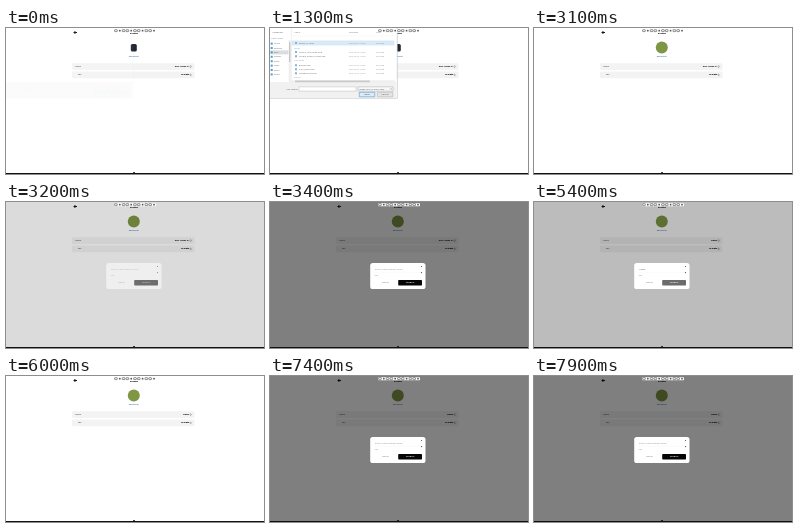
These frames come from a looping animation (258x146 px, 8000 ms). An HTML page with a canvas:

```html
<!DOCTYPE html>
<html lang="en">
<head>
<meta charset="utf-8">
<title>Profile settings</title>
<style>
html, body { margin: 0; width: 100%; height: 100%; overflow: hidden; background: #fff; }
canvas { display: block; width: 258px; height: 146px; }
</style>
</head>
<body>
<canvas id="stage"></canvas>
<script>
const W = 258, H = 146, LOOP = 8000;
const canvas = document.getElementById('stage');
const ctx = canvas.getContext('2d');
const dpr = window.devicePixelRatio || 1;
canvas.width = W * dpr;
canvas.height = H * dpr;

const OLD_NAME = 'user name 01', NEW_NAME = 'Nadia';
const HINT = 'Enter a new display name';

const ramp = (t, a, b) => Math.max(0, Math.min(1, (t - a) / (b - a)));
const ease = p => p * p * (3 - 2 * p);

function box(x, y, w, h, fill, stroke, r = 0) {
  ctx.beginPath();
  ctx.roundRect(x, y, w, h, r);
  if (fill) { ctx.fillStyle = fill; ctx.fill(); }
  if (stroke) { ctx.strokeStyle = stroke; ctx.lineWidth = 0.5; ctx.stroke(); }
}

function dot(x, y, r, fill) {
  ctx.beginPath();
  ctx.arc(x, y, r, 0, Math.PI * 2);
  ctx.fillStyle = fill;
  ctx.fill();
}

function line(points, color, width = 0.5) {
  ctx.beginPath();
  points.forEach(([x, y], i) => i ? ctx.lineTo(x, y) : ctx.moveTo(x, y));
  ctx.strokeStyle = color;
  ctx.lineWidth = width;
  ctx.stroke();
}

function text(s, x, y, size, color, align = 'left', weight = 400) {
  ctx.font = `${weight} ${size}px "Open Sans", sans-serif`;
  ctx.textAlign = align;
  ctx.textBaseline = 'middle';
  ctx.fillStyle = color;
  ctx.fillText(s, x, y);
}

function withAlpha(a, draw) {
  if (a <= 0) return;
  ctx.save();
  ctx.globalAlpha = a;
  draw();
  ctx.restore();
}

function row(y, label, labelX, value, weight) {
  box(66, y, 122.5, 6.6, '#f3f3f3', null, 0.8);
  text(label, labelX, y + 3.3, 2, '#444', 'left', 600);
  text(value, 183.4, y + 3.3, 2.2, '#000', 'right', weight);
  line([[184.3, y + 2.4], [185.3, y + 3.3], [184.3, y + 4.2]], '#222');
}

function drawPage(t) {
  box(0, 0, W, H, '#fff');
  line([[71, 4.5], [68, 4.5], [69.4, 3]], '#000', 0.9);
  line([[68, 4.5], [69.4, 6]], '#000', 0.9);
  text('Profile', 128, 5.3, 2.3, '#000', 'center', 800);
  if (t < 2200) box(124.8, 16, 6, 7.6, '#202836', null, 1.6);
  else dot(127.8, 19.5, 6, '#7f9645');
  text('Edit photo', 127.8, 28.6, 2, '#1f63b0', 'center', 600);
  row(35.3, 'Name', 69, t < 5300 ? OLD_NAME : NEW_NAME, 700);
  row(43.6, 'Sex', 72, 'Private', 800);
  box(127, 144, 2, 1, '#444');
}

function drawSidebar() {
  text('Organize', 2.5, 4, 2.5, '#555');
  text('New folder', 1, 10, 2.4, '#888');
  box(0, 22.4, 18.5, 4, '#d9dde1');
  ['Home', 'Desktop', 'Files', 'Images', 'Music', 'Video', 'Disk C', 'Disk D'].forEach((s, i) => {
    const y = 15.6 + i * 4.4;
    box(0.7, y - 1, 2, 2, '#4d9bd3');
    text(s, 3.7, y, 2.2, '#666');
  });
  box(18.7, 12, 2, 42, '#eee');
  box(19, 14, 1.4, 20, '#c6c6c6');
}

function drawFiles(hover) {
  text('Name', 24, 4.1, 2.2, '#777');
  text('Modified', 79, 4.1, 2.2, '#777');
  text('Type', 106, 4.1, 2.2, '#777');
  line([[22, 8], [124, 8]], '#f0f0f0');
  const rows = [
    ['photo_01.png', 15], ['', 20], ['screen_recording.png', 24], ['profile_picture_draft.png', 28.2],
    ['', 32.8], ['garden.jpg', 37.2], ['icon_large.png', 41.2], ['background.png', 45.2], ['', 49.5]
  ];
  rows.forEach(([name, y], i) => {
    if (i === hover) box(22, y - 2.1, 102, 4.2, '#d9ebf9', '#c2def3');
    if (!name) {
      text(['Today', 'This week', 'Earlier'][(i - 1) / 3 | 0], 24, y, 2.2, '#8ba2b8');
      return;
    }
    box(25, y - 1, 2, 2, '#84b5d8');
    text(name, 29, y, 2.3, '#666');
    text('2021/4/12 10:' + (20 + i), 79, y, 2.2, '#8b8b8b');
    text('PNG file', 106, y, 2.2, '#8b8b8b');
  });
  box(22, 52.2, 103, 2.3, '#efefef');
  box(25, 52.5, 75, 1.7, '#c9c9c9');
}

function drawFooter(t) {
  text('File name:', 28, 61, 2.4, '#555', 'right');
  box(29, 58.8, 57, 4.3, '#fff', '#bbb');
  if (t >= 1500) text('photo_01.png', 30, 61, 2.3, '#444');
  box(88, 58.8, 35, 4.3, '#f8f8f8', '#aaa');
  text('Image files (*.png;*.jpg)', 89, 61, 2.3, '#555');
  line([[120, 60.5], [120.9, 61.4], [121.8, 60.5]], '#666');
  box(89.3, 64.3, 15.5, 4.5, '#dcebf7', '#3786c5');
  text('Open', 97, 66.5, 2.4, '#444', 'center');
  box(107.3, 64.3, 15.5, 4.5, '#e4e4e4', '#aaa');
  text('Cancel', 115, 66.5, 2.4, '#555', 'center');
}

function drawPicker(t) {
  const opening = t < 1700;
  const shown = opening ? 0.04 + 0.96 * ramp(t, 0, 250) : 1 - ramp(t, 1700, 1900);
  const hover = t < 800 ? -1 : t < 900 ? 7 : t < 1000 ? 5 : t < 1100 ? 3 : t < 1200 ? 2 : 0;
  withAlpha(shown, () => {
    box(-2, -2, 129.3, 72.3, '#fff', '#aaa');
    // The panel tint arrives before the controls do.
    withAlpha(opening ? Math.max(0.3, shown) : shown, () => box(0, 54, 126, 16, '#f1f1f1'));
    drawFooter(t);
    withAlpha(shown * ramp(t, 150, 350), drawSidebar);
    withAlpha(shown * ramp(t, 250, 450), () => drawFiles(hover));
    line([[21.3, 0], [21.3, 55]], '#ddd');
  });
}

function fieldText(t) {
  if (t >= 6800 || t < 3900) return [HINT, '#888'];
  if (t < 4500) {
    const left = 1 - Math.min(6, Math.floor((t - 3900) / 100) + 1) / 6;
    return [HINT.slice(0, Math.floor(HINT.length * left)), '#888'];
  }
  return [NEW_NAME.slice(0, Math.max(0, Math.floor((t - 4600) / 100) + 1)), '#555'];
}

function drawModal(t) {
  const amount = t < 5200 ? ease(ramp(t, 3100, 3390))
    : t < 6800 ? 1 - ramp(t, 5220, 5600)
    : ease(ramp(t, 7100, 7400));
  if (amount <= 0) return;
  box(0, 0, W, H, `rgba(0,0,0,${0.5 * amount})`);
  withAlpha(Math.min(1, amount * 2), () => {
    box(100.2, 61, 55.3, 26, '#fff', null, 2.6);
    line([[151, 64], [152, 65]], '#333');
    line([[152, 64], [151, 65]], '#333');
    const [s, color] = fieldText(t);
    text(s, 105, 67.8, 2.3, color);
    line([[104.7, 70.3], [152, 70.3]], '#eee', 0.3);
    dot(151.5, 70.6, 0.6, '#444');
    text('0/20', 104.7, 73.3, 1.7, '#777');
    text('Cancel', 115.3, 80.8, 2.2, '#666', 'center');
    const saving = t >= 5200 && t < 6800;
    box(128.2, 78, 23.8, 5.5, saving ? '#6b6b6b' : '#050505', null, 0.7);
    text('Confirm', 140, 80.8, 2.2, '#fff', 'center', 600);
  });
}

function drawToolbar() {
  box(108, 1.2, 42, 3, '#fff', null, 0.8);
  for (let i = 0; i < 11; i++) {
    const x = 108.6 + i * 3.8;
    if (i % 3 === 1) dot(x + 1.4, 2.7, 0.9, '#555');
    else box(x, 1.7, 2.7, 1.9, '#fff', '#222', 0.5);
  }
}

function frame(now) {
  const t = now % LOOP;
  ctx.setTransform(dpr, 0, 0, dpr, 0, 0);
  drawPage(t);
  if (t < 1900) drawPicker(t);
  drawModal(t);
  drawToolbar();
  box(0, 145, W, 1, '#111');
  requestAnimationFrame(frame);
}
requestAnimationFrame(frame);
</script>
</body>
</html>
```
